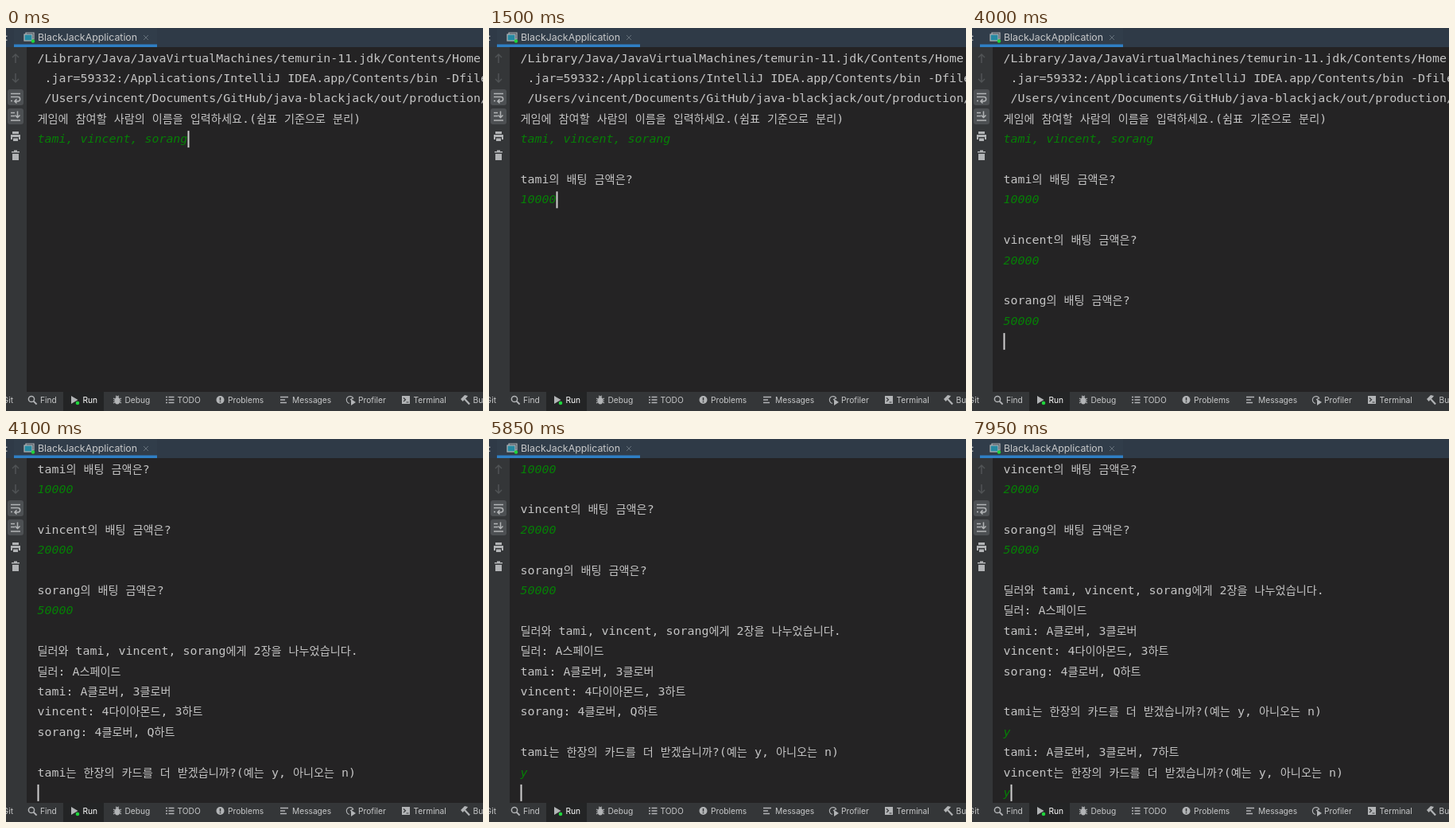
Write an HTML page that moves like this. It is 600 px wide and 481 px high and loops after 8000 ms.

```html
<!DOCTYPE html>
<html lang="ko">
<head>
<meta charset="utf-8">
<title>Console</title>
<style>
html, body { margin: 0; width: 100%; height: 100%; overflow: hidden; background: #242324; }
svg { display: block; }
text { white-space: pre; }
.ui { font: 10.2px Inter, sans-serif; fill: #c8c9ca; }
.tab { font-size: 12.35px; }
#lines { font: 14.95px "DejaVu Sans Mono", monospace; fill: #c4c4c4; }
#lines .in { font-style: italic; fill: #067f06; }
.ko { font: 14.16px "Noto Sans CJK KR", "Noto Sans CJK", sans-serif; }
.icon { fill: none; stroke: #b2b4b6; stroke-width: 1.5; }
.solid { fill: #b2b4b6; stroke: none; }
.dim { stroke: #505355; }
.dot { fill: #1fd53c; stroke: none; }
</style>
</head>
<body>
<svg width="600" height="481" viewBox="0 0 600 481">
  <rect width="600" height="481" fill="#242324"/>
  <g id="lines"></g>
  <rect id="caret" width="2" height="21" fill="#cfcfcf"/>

  <rect width="600" height="24" fill="#2f3a47"/>
  <rect x="10" width="180" height="24" fill="#313d4a"/>
  <rect x="10" y="20.500" width="180" height="3.500" fill="#2f7fc4"/>
  <rect y="24" width="26" height="433" fill="#343638"/>
  <rect y="457" width="600" height="24" fill="#343638"/>
  <rect x="72" y="457" width="51" height="24" fill="#232425"/>
  <g fill="#4d5053">
    <rect x="2" y="77" width="20" height="20" rx="3"/>
    <rect x="2" y="101" width="20" height="20" rx="3"/>
  </g>

  <g class="icon">
    <path d="M25 8V6H35V14H33" stroke-width="1.2"/>
    <rect x="23" y="8" width="10" height="8" fill="#268aa3" stroke-width="1.2"/>
    <circle class="dot" cx="34" cy="16.5" r="2.2"/>
    <path d="M173 9l6 6m0-6l-6 6" stroke="#65707a" stroke-width="1"/>

    <path class="dim" d="M12 44V33m-4 4l4-4 4 4M12 57V68m-4-4l4 4 4-4"/>
    <path d="M6 82.500H18M6 86.500H15a2.700 2.700 0 0 1 0 5.400H11m2.500-2.600l-2.600 2.600 2.600 2.600M6 91.500H8"/>
    <path d="M6 106.500H11M6 110.500H11M6 116H18M14.500 104.500V112.500m-3-3l3 3 3-3"/>
    <path class="solid" d="M8 130H16V133H8zM6 134H18V140H16V137H8V140H6zM9 138.500H15V142H9z"/>
    <path class="solid" d="M7 155H10V153.500H14V155H17V156.500H7zM8 158H16V166H8z"/>

    <circle cx="32" cy="466" r="3.6"/>
    <path d="M34.600 468.600l4 4" stroke-width="2"/>
    <path class="solid" d="M82 462l8.500 5-8.500 5z"/>
    <circle class="dot" cx="90" cy="471" r="2.3"/>
    <ellipse class="solid" cx="140" cy="468" rx="3.200" ry="4.500"/>
    <path d="M135 465l10 6m0-6l-10 6M135 468H145M138 462l4 2m0-2l-4 2" stroke-width="1.100"/>
    <path d="M201 463.500h2m1.500 0h7M201 467h2m1.500 0h7M201 470.500h2m1.500 0h7"/>
    <circle class="solid" cx="269.500" cy="467" r="5"/>
    <path d="M269.500 464v3.700m0 1v1.500" stroke="#343638"/>
    <path d="M345 463.500h10M345 467h6M345 470.500h8"/>
    <path d="M432 471.500a4.500 4.500 0 1 1 5-6M433 467l3-2" stroke-width="1.200"/>
    <path class="solid" d="M434 466l6 4-6 4z"/>
    <rect class="solid" x="498" y="462" width="10" height="10"/>
    <path d="M500 464.500l2.500 2.300-2.500 2.300M503.500 470h3" stroke="#343638" stroke-width="1.200"/>
    <path d="M577 466l6 6.500" stroke-width="2.200"/>
    <path class="solid" d="M572 466l5-5 4 1-1.500 2-5 5z"/>
  </g>

  <g class="ui">
    <text class="tab" x="-1" y="16">:</text>
    <text class="tab" x="40" y="16">BlackJackApplication</text>
    <text x="9" y="471" text-anchor="end">Git</text>
    <text x="43" y="471">Find</text>
    <text x="96.500" y="471" fill="#fff">Run</text>
    <text x="149.500" y="471">Debug</text>
    <text x="215.500" y="471">TODO</text>
    <text x="279" y="471">Problems</text>
    <text x="360" y="471">Messages</text>
    <text x="443" y="471">Profiler</text>
    <text x="512.500" y="471">Terminal</text>
    <text x="587.500" y="471">Build</text>
  </g>
</svg>
<script>
const LOOP = 8000, STEP = 50, BLINK = 335;
const LEFT = 39.5, TOP = 38, PITCH = 25.4, CHAR = 9, LAST_ROW = 16;
const [A, B, C] = ['tami', 'vincent', 'sorang'];
const lines = document.getElementById('lines'), caret = document.getElementById('caret');

const events = [];
const print = (t, text) => events.push({ t, text });
const type = (text, ...times) => times.forEach((t, i) => events.push({ t, text: text[i], typed: true }));
const bet = name => `\n${name}의 배팅 금액은?\n`;
const ask = name => `${name}는 한장의 카드를 더 받겠습니까?(예는 y, 아니오는 n)\n`;

print(0, `/Library/Java/JavaVirtualMachines/temurin-11.jdk/Contents/Home
 .jar=59332:/Applications/IntelliJ IDEA.app/Contents/bin -Dfile
 /Users/${B}/Documents/GitHub/java-blackjack/out/production/
게임에 참여할 사람의 이름을 입력하세요.(쉼표 기준으로 분리)
`);
events.push({ t: 0, text: `${A}, ${B}, ${C}`, typed: true });
type('\n', 50);
print(150, bet(A));
type('10000\n', 950, 1100, 1200, 1300, 1400, 1550);
print(1640, bet(B));
type('20000\n', 2100, 2250, 2350, 2450, 2550, 2750);
print(2900, bet(C));
type('50000\n', 3100, 3250, 3350, 3450, 3550, 3750);
print(4075, `
딜러와 ${A}, ${B}, ${C}에게 2장을 나누었습니다.
딜러: A스페이드
${A}: A클로버, 3클로버
${B}: 4다이아몬드, 3하트
${C}: 4클로버, Q하트

${ask(A)}`);
type('y\n', 5600, 5800);
print(5900, `${A}: A클로버, 3클로버, 7하트\n${ask(B)}`);
print(6078, ''); // restarts the caret blink
type('y', 7900);

function draw(t) {
  const rows = [{ text: '' }];
  let last = 0;
  for (const e of events) {
    if (e.t > t) break;
    last = e.t;
    e.text.split('\n').forEach((part, i) => {
      if (i) rows.push({ text: '' });
      const row = rows[rows.length - 1];
      row.text += part;
      if (part && e.typed) row.typed = true;
    });
  }
  const end = rows.length - 1, scroll = Math.max(0, end - LAST_ROW);
  const rowY = i => TOP + (i - scroll) * PITCH;
  lines.innerHTML = rows.map((r, i) => i < scroll ? '' :
    `<text x="${LEFT}" y="${rowY(i) + 4.6}"${r.typed ? ' class="in"' : ''}>` +
    r.text.replace(/[가-힣]+/g, '<tspan class="ko">$&</tspan>') + '</text>').join('');
  caret.setAttribute('x', LEFT + rows[end].text.length * CHAR);
  caret.setAttribute('y', rowY(end) - 10.5);
  caret.style.opacity = Math.floor((t - last) / BLINK) % 2 ? 0 : 1;
}

const start = performance.now();
let shown = -1;
function tick() {
  const t = Math.floor((performance.now() - start) % LOOP / STEP) * STEP;
  if (t !== shown) draw(shown = t);
  requestAnimationFrame(tick);
}
tick();
</script>
</body>
</html>
```
